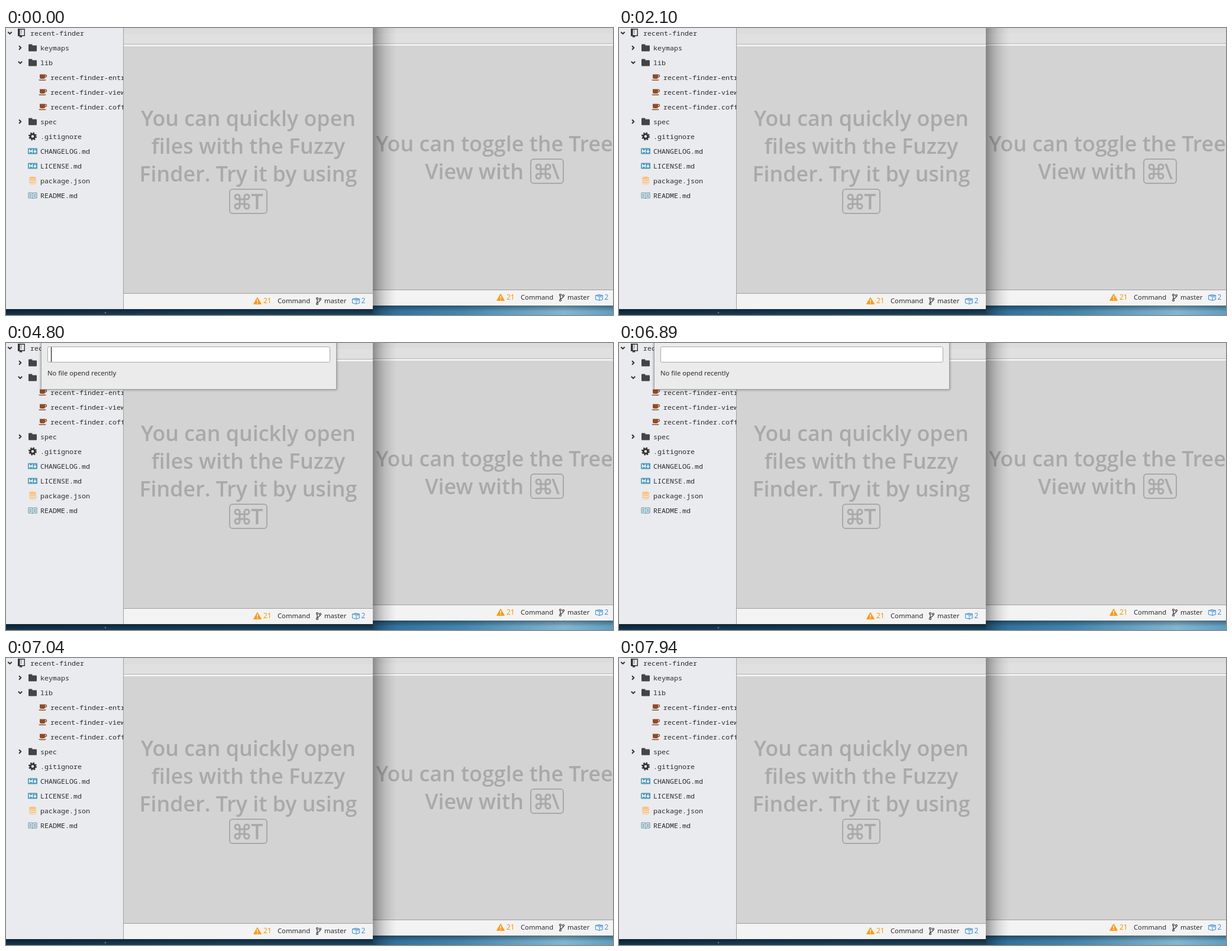
Animation of 1026 by 486 pixels, one loop 8 s. Source, as an HTML page:

```html
<!DOCTYPE html>
<html lang="en">
<head>
<meta charset="utf-8">
<title>Recent finder</title>
<style>
  html, body { margin: 0; width: 100%; height: 100%; overflow: hidden; }
  svg { display: block; width: 100%; height: 100%; }
  text { white-space: pre; }
  .ui { font: 11.25px "Noto Sans", sans-serif; fill: #2b2b2b; }
  .count { font-size: 12px; }
  .tree { font: 11.667px "Noto Sans Mono", monospace; fill: #2b2b2b; }
  .tip { font: 600 35.8px "Open Sans", "Noto Sans", sans-serif; fill: #a9a9a9; }
  .mid { text-anchor: middle; }
  .line { fill: none; stroke: #a9a9a9; stroke-width: 2; }
</style>
</head>
<body>
<svg viewBox="0 0 1026 486">
  <defs>
    <linearGradient id="sky">
      <stop offset="0" stop-color="#1f5178"/>
      <stop offset=".3" stop-color="#2a6690"/>
      <stop offset=".6" stop-color="#2c6b96"/>
      <stop offset=".75" stop-color="#4485ad"/>
      <stop offset=".92" stop-color="#82b6d1"/>
      <stop offset="1" stop-color="#5f9ec0"/>
    </linearGradient>
    <linearGradient id="wide">
      <stop offset="0" stop-opacity=".38"/>
      <stop offset=".25" stop-opacity=".23"/>
      <stop offset=".5" stop-opacity=".12"/>
      <stop offset=".75" stop-opacity=".05"/>
      <stop offset="1" stop-opacity="0"/>
    </linearGradient>
    <linearGradient id="narrow">
      <stop offset="0" stop-opacity=".26"/>
      <stop offset=".4" stop-opacity=".1"/>
      <stop offset="1" stop-opacity="0"/>
    </linearGradient>
    <linearGradient id="below" x2="0" y2="1">
      <stop offset="0" stop-opacity=".6"/>
      <stop offset="1" stop-opacity=".35"/>
    </linearGradient>
    <linearGradient id="belowNarrow" x2="0" y2="1">
      <stop offset="0" stop-opacity=".35"/>
      <stop offset="1" stop-opacity="0"/>
    </linearGradient>
    <filter id="soft"><feGaussianBlur stdDeviation="2"/></filter>

    <path id="cmd" fill="none" stroke="#a9a9a9" stroke-width="3"
      d="M-8-4H8A4 4 0 1 0 4-8V8A4 4 0 1 0 8 4H-8A4 4 0 1 0-4 8V-8A4 4 0 1 0-8-4Z"/>

    <!-- Tree icons, centred on the origin -->
    <path id="closed" d="M-2-3.2 1.2 0-2 3.2" fill="none" stroke="#333" stroke-width="2"/>
    <path id="open" d="M-3.2-1.8 0 1.4 3.2-1.8" fill="none" stroke="#333" stroke-width="2"/>
    <g id="repo">
      <path d="M-5.3-6.5H5.3V4.5H-5.3Z" fill="none" stroke="#333" stroke-width="1.4"/>
      <path d="M-6-7h3.5V5H-6ZM-3 4H1V8L-1 6.6-3 8Z" fill="#333"/>
      <path d="M-1-4.5H.5M-1-2H.5M-1 .5H.5" stroke="#333"/>
    </g>
    <path id="folder" fill="#444" d="M-7-5q0-1 1-1h4.5q1 0 1 1v1H6q1 0 1 1V5q0 1-1 1H-6q-1 0-1-1Z"/>
    <g id="cup">
      <path fill="#8f4c28" d="M-5-5H4V0q0 2.5-2.5 2.5H-2.5Q-5 2.5-5 0ZM-7 4H6L4.5 5.5H-5.5Z"/>
      <path fill="none" stroke="#8f4c28" stroke-width="1.4" d="M4-4H5q1.5 0 1.5 1.7T4.5-.5H4"/>
    </g>
    <g id="gear" fill="none" stroke="#333">
      <circle r="3.8" stroke-width="3"/>
      <circle r="5.7" stroke-width="2.6" stroke-dasharray="2.238"/>
    </g>
    <g id="mark">
      <rect x="-8" y="-5" width="16" height="10" rx="1" fill="#519aba"/>
      <path d="M-5.5 3V-2L-3 1-.5-2V3M4-3V2M1.8 0 4 2.3 6.2 0" fill="none" stroke="#fff" stroke-width="1.4"/>
    </g>
    <g id="data" fill="#fcc27c">
      <ellipse cy="-4.5" rx="6" ry="2.4"/>
      <path d="M-6-3Q0 1 6-3V-.5Q0 3-6-.5ZM-6 .8Q0 4.5 6 .8V3Q0 6.5-6 3ZM-6 4.3Q0 8 6 4.3V5Q0 9-6 5Z"/>
    </g>
    <path id="book" fill="none" stroke="#5c95aa" d="M0-4Q-2-5-7-4.5V4.5Q-2 4 0 5Q2 4 7 4.5V-4.5Q2-5 0-4V5M-5.5-2H-1.8M-5.5 0H-1.8M-5.5 2H-1.8M1.8-2H5.5M1.8 0H5.5M1.8 2H5.5"/>

    <g id="status" class="ui">
      <path d="M425 457 431 467.3H419Z" fill="#ff9a16" stroke="#ff9a16" stroke-width="1.6" stroke-linejoin="round"/>
      <path d="M425 459.5V463.8M425 465V466.6" stroke="#fff" stroke-width="1.5"/>
      <text class="count" x="435" y="466" fill="#ff9500">21</text>
      <text x="459" y="466">Command</text>
      <g fill="none" stroke="#333" stroke-width="1.2">
        <path d="M526 459.500V466M531 460.500Q531 463 526.500 464.500"/>
        <circle cx="526" cy="458" r="1.5"/><circle cx="531" cy="459" r="1.5"/><circle cx="526" cy="467" r="1.5"/>
      </g>
      <text x="538" y="466">master</text>
      <path d="M585.5 459 592 457.5 597.5 459V465.5L592 467.5 585.5 465.5ZM585.5 459 592 461 597.5 459M592 461V467.5M588.5 458.3 595 460V463" fill="none" stroke="#4a97e0" stroke-width="1.1"/>
      <text class="count" x="600.5" y="466" fill="#4a90d9">2</text>
    </g>
  </defs>

  <rect width="1026" height="486" fill="url(#sky)"/>
  <circle cx="168" cy="482" r="1.3" fill="#b9d3e6"/>

  <!-- Back window -->
  <rect x="620" y="470" width="406" height="10" fill="url(#belowNarrow)"/>
  <rect x="600" width="426" height="470" fill="#d3d3d3"/>
  <rect x="600" width="426" height="26" fill="#dcdcdc"/>
  <rect x="600" y="9" width="426" height="17" fill="#e0e0e0"/>
  <rect x="600" y="26" width="426" height="1" fill="#b5b5b5"/>
  <rect x="600" y="27" width="426" height="3" fill="#f2f2f2"/>
  <rect x="600" y="443" width="426" height="27" fill="#f3f3f3"/>
  <rect x="600" y="443" width="426" height="1" fill="#a0a0a0"/>
  <use href="#status" x="411" y="-6"/>
  <g id="backTip">
    <text class="tip mid" x="825.5" y="208.5">You can toggle the Tree</text>
    <text class="tip mid" x="791.5" y="255.5">View with</text>
    <rect class="line" x="887" y="222" width="55" height="41" rx="5"/>
    <use href="#cmd" x="908" y="243"/>
    <text class="tip mid" x="929" y="255.5">\</text>
  </g>

  <g id="wideShadow">
    <rect x="620" width="40" height="486" fill="url(#wide)"/>
    <rect y="476" width="620" height="10" fill="url(#below)"/>
  </g>
  <g id="narrowShadow">
    <rect x="620" width="12" height="480" fill="url(#narrow)"/>
    <rect y="476" width="620" height="10" fill="url(#belowNarrow)"/>
  </g>

  <!-- Front window -->
  <rect width="620" height="476" fill="#d3d3d3"/>
  <rect x="199" width="421" height="27" fill="#dcdcdc"/>
  <rect x="199" y="10" width="421" height="17" fill="#e0e0e0"/>
  <rect x="199" y="27" width="421" height="1" fill="#b5b5b5"/>
  <rect x="199" y="28" width="421" height="3" fill="#f2f2f2"/>
  <rect x="199" y="449" width="421" height="27" fill="#f3f3f3"/>
  <rect x="199" y="449" width="421" height="1" fill="#a0a0a0"/>
  <use href="#status"/>
  <g class="tip mid">
    <text x="409.5" y="165.5">You can quickly open</text>
    <text x="409.5" y="212.5">files with the Fuzzy</text>
    <text x="409.5" y="259.5">Finder. Try it by using</text>
    <text x="424.5" y="306.5">T</text>
  </g>
  <rect class="line" x="378" y="273" width="63" height="41" rx="5"/>
  <use href="#cmd" x="399" y="294"/>

  <rect width="198" height="476" fill="#e9ebee"/>
  <rect x="198" width="1" height="476" fill="#a0a0a0"/>
  <svg id="tree" class="tree" width="198" height="476"></svg>

  <g id="finder">
    <rect x="59" y="-10" width="500" height="89" opacity=".4" filter="url(#soft)"/>
    <rect x="59.5" y="-10" width="499" height="88.5" fill="#ebebeb" stroke="#a0a0a0"/>
    <rect x="70.5" y="6.5" width="477" height="26" rx="2" fill="#fff" stroke="#a9a9a9"/>
    <text class="ui" x="70" y="55">No file opend recently</text>
    <rect id="caret" x="76" y="7" width="1" height="25"/>
  </g>
</svg>
<script>
  const byId = id => document.getElementById(id);

  // name, icon, text x, icon x, chevron, chevron x
  const rows = [
    ["recent-finder", "repo", 41, 26, "open", 6.5],
    ["keymaps", "folder", 58, 45, "closed", 24],
    ["lib", "folder", 58, 45, "open", 24],
    ["recent-finder-entry.coffee", "cup", 75, 62],
    ["recent-finder-view.coffee", "cup", 75, 62],
    ["recent-finder.coffee", "cup", 75, 62],
    ["spec", "folder", 58, 45, "closed", 24],
    [".gitignore", "gear", 58, 45],
    ["CHANGELOG.md", "mark", 58, 45],
    ["LICENSE.md", "mark", 58, 45],
    ["package.json", "data", 58, 45],
    ["README.md", "book", 58, 45]
  ];
  const icon = (id, x, y) => `<use href="#${id}" x="${x}" y="${y}"/>`;
  byId("tree").innerHTML = rows.map(([name, kind, textX, iconX, chevron, chevronX], i) => {
    const y = 8.5 + 25 * i;
    return icon(kind, iconX, y) + (chevron ? icon(chevron, chevronX, y) : "") +
      `<text x="${textX}" y="${y + 4}">${name}</text>`;
  }).join("");

  const LOOP = 8000;
  const show = (id, visible) => byId(id).setAttribute("visibility", visible ? "inherit" : "hidden");
  const within = (t, from, to) => t >= from && t < to;

  function draw(now) {
    const t = now % LOOP;
    const unfocused = within(t, 150, 2100);
    show("narrowShadow", unfocused);
    show("wideShadow", !unfocused);
    show("finder", within(t, 4800, 7040));
    show("caret", within(t, 4800, 5250) || within(t, 5700, 6000) || within(t, 6440, 6890));
    byId("backTip").setAttribute("opacity", t < 7790 ? 1 : t < 7940 ? 0.4 : 0);
  }

  const start = performance.now();
  function tick() {
    draw(performance.now() - start);
    requestAnimationFrame(tick);
  }
  tick();
</script>
</body>
</html>
```
